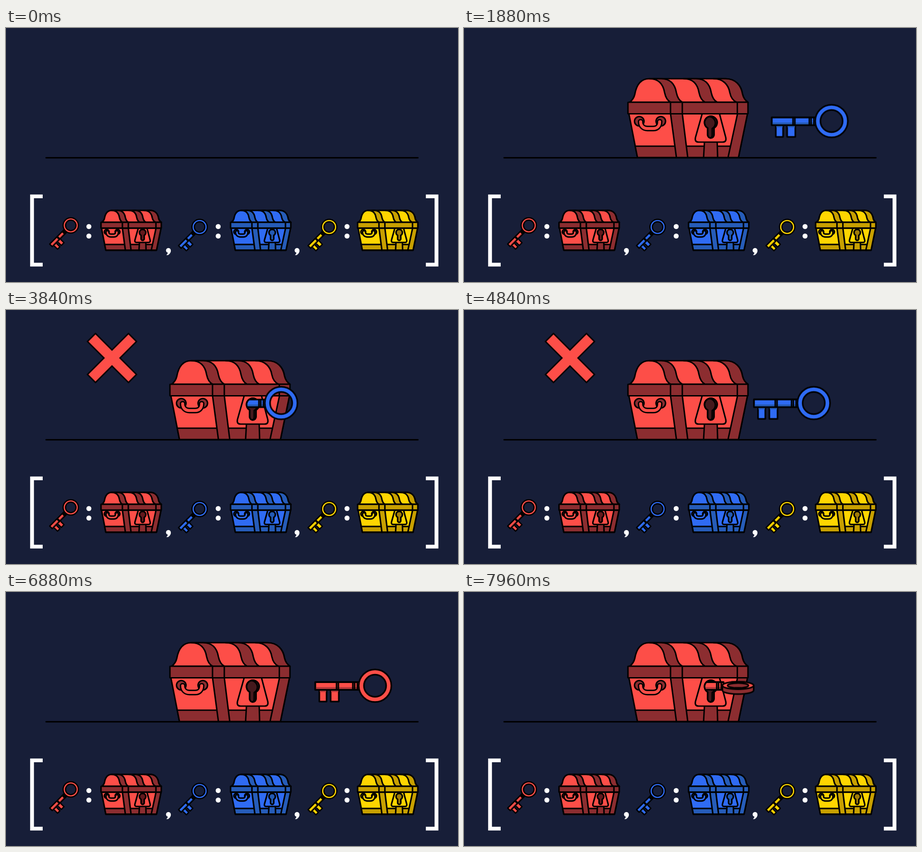
Write an HTML page that moves like this. It is 998 px wide and 561 px high and loops after 8000 ms.

```html
<!DOCTYPE html>
<html lang="en">
<head>
<meta charset="utf-8">
<title>Keys and chests</title>
<style>
  html, body { margin: 0; width: 100%; height: 100%; overflow: hidden; background: #171e38; }
  svg { display: block; width: 998px; height: 561px; }
  .art { stroke: #000; stroke-width: var(--w); stroke-linejoin: round; }
  .red { --light: #fd4e48; --dark: #8c2d30; --shade: #b8393a; --hole: #64191d; }
  .blue { --light: #2f6bf3; --dark: #265cb8; --shade: #265cb8; --hole: #235ab4; }
  .yellow { --light: #ffd500; --dark: #c8a000; --shade: #c8a000; --hole: #a07c08; }
  .l { fill: var(--light); }
  .d { fill: var(--dark); }
  .s { fill: var(--shade); }
  .n { fill: none; }
  .handle { fill: none; stroke-linecap: round; stroke-width: calc(6px + 2 * var(--w)); }
  .handle + .handle { stroke: var(--light); stroke-width: 6.5px; }
</style>
</head>
<body>
<svg id="stage" viewBox="0 0 998 561"></svg>
<script>
const HOLE = 'M538,221A14 14 0 1 1 552,221V236A7 7 0 0 1 538,236Z';

// Dark stripe over the lid between two parallel curves.
const stripe = (a, b) => `<path class="d" d="M${a},112c21,0 31,13 34,31c2,10 6,17 13,21
  H${b + 47}c-7,-4 -11,-11 -13,-21c-3,-18 -13,-31 -34,-31z"/>`;

function chest(color, width, detail = '') {
  return `<g class="art ${color}" style="--w:${width}px">
    <path class="l" d="M364,189L383,286H606L626,189Z"/>
    <path class="d" d="M378,261H606L602,286H383Z"/>
    <path class="d" d="M456,189H482L494,286H469Z"/>
    <path class="d" d="M604,189H626L606,286H583Z"/>
    <path class="d" d="M531,250H559L560,286H529Z"/>
    <path class="l" d="M526,189H564L578,242Q580,252 571,252H518Q509,252 511,242Z"/>
    <path d="${HOLE}" style="fill:var(--hole)"/>${detail}
    <circle class="d" cx="387" cy="206" r="10.5"/><circle class="d" cx="434.5" cy="206" r="10.5"/>
    ${'<path class="handle" d="M390,207C390,217 397,222 405,222H418C426,222 432,217 432,207"/>'.repeat(2)}
    <path class="l" d="M366,164C372,159 375,155 377,147C381,124 392,112 409,112H577
      C600,112 612,127 615,146C617,155 621,160 627,164Z"/>
    ${stripe(409, 435)}${stripe(485, 512)}
    <path class="d" d="M551,112c21,0 33,13 36,31c2,10 6,17 15,21H627
      C621,160 617,155 615,146C612,127 600,112 577,112Z"/>
    <rect class="d" x="362" y="164" width="265" height="25.5" rx="1"/>
    <path class="n" d="M456,164V189M482,164V189M603.5,164V189"/>
  </g>`;
}

const ellipse = (rx, ry) => `M${-rx},0A${rx} ${ry} 0 0 1 ${rx},0A${rx} ${ry} 0 0 1 ${-rx},0Z`;

// Key bow, turned about the shaft by a number of degrees.
function bow(deg) {
  const s = Math.sin(deg * Math.PI / 180), c = Math.cos(deg * Math.PI / 180);
  const R = 36 - 1.5 * s, r = 24.5 - 1.5 * s, ry = r * c, depth = 11 * s;
  const x = r * Math.sqrt(Math.max(0, 1 - (depth / 2 / ry) ** 2)), mid = depth / 2;
  const side = deg ? `<path class="d" fill-rule="evenodd" d="M${-R},0A${R} ${R * c} 0 0 1 ${R},0
    v${depth}A${R} ${R * c} 0 0 1 ${-R},${depth}Z
    M${-x},${mid}A${r} ${ry} 0 0 1 ${x},${mid}A${r} ${ry} 0 0 1 ${-x},${mid}Z"/>` : '';
  return `<g class="bow" transform="translate(${-2 * s} ${6 * s * c - 2 * s})">${side}
    <path class="l" fill-rule="evenodd" d="${ellipse(R, R * c)}${ellipse(r, ry)}"/></g>`;
}

function key(color, width, poses = [0]) {
  return `<g class="art ${color}" style="--w:${width}px">
    <path class="l" d="M-123,9h16v26h-16zM-98,9h18v26h-18z"/>
    <path class="s" stroke="none" d="M-122,10h14v4h-14zM-97,10h16v4h-16z"/>
    <path class="l" d="M-132,-8H-34V9H-132Z"/>
    <path class="s" stroke="none" d="M-131,3H-35V8H-131Z"/>
    <path class="n" d="M-132,-8H-34V9H-132ZM-85,-8V9M-81,-8V9M-49,-8V9M-45,-8V9M-39,-8V9"/>
    ${poses.map(bow).join('')}
  </g>`;
}

const entry = (color, keyX, keyY, colonX, chestX) => `
  <g transform="translate(${keyX} ${keyY}) rotate(-45) scale(.47)">${key(color, 5.8)}</g>
  <g fill="#fff"><circle cx="${colonX}" cy="438.5" r="5.5"/><circle cx="${colonX}" cy="459.5" r="5.5"/></g>
  <g transform="translate(${chestX} 346.3) scale(.502 .505)">${chest(color, 6.6)}</g>`;

const comma = x => `<path fill="#fff" d="M${x},486c3.500,0 5.500,2.500 5.500,6c0,4 -2.500,7 -6,9.500
  h-4c2,-2 3,-3.500 3.300,-5.200c-2.600,-.500 -4,-2.500 -4,-5c0,-3 2.200,-5.300 5.200,-5.300z"/>`;

const lockDepth = `<g clip-path="url(#hole)"><path fill="#45191d" transform="translate(-4 1)" d="${HOLE}"/></g>
  <path class="n" d="${HOLE}"/>`;

const TURN = [0, 1, 2, 3, 4, 5].map(i => i * 15.2);
const bigKey = (id, x, y, poses) => `<g id="${id}"><g transform="translate(${x} ${y})">
  <g class="lift">${key(id, 3.4, poses)}</g></g></g>`;

stage.innerHTML = `
  <defs>
    <clipPath id="hole"><path d="${HOLE}"/></clipPath>
    <clipPath id="ground"><path d="M0,0H998V286H0Z"/></clipPath>
    <clipPath id="lock"><path d="M545,0H998V286H545Z"/><path d="M545,195A14 14 0 0 0 534,217.500H545Z"/></clipPath>
  </defs>
  <g clip-path="url(#ground)">
    <g id="chest">${chest('red', 3.2, lockDepth)}</g>
    <g transform="translate(234 106)"><g id="cross">
      <path transform="rotate(45)" fill="#fd4e48" stroke="#000" stroke-width="3"
        d="M-12.500,-64h25v51.500h51.500v25h-51.500v51.500h-25v-51.500h-51.500v-25h51.500z"/>
    </g></g>
  </g>
  <g clip-path="url(#lock)">${bigKey('blue', 811.5, 205.5, TURN.slice(0, 2))}${bigKey('red', 815, 207, TURN)}</g>
  <path id="rim" fill="none" stroke="#000" stroke-width="3.200"
    d="M545,195A14 14 0 0 0 538,221V236A7 7 0 0 0 545,243"/>
  <path stroke="#000" stroke-width="3.200" stroke-linecap="round" d="M88.500,286.600H909.500"/>
  ${entry('red', 143, 436, 183, 28.1)}${comma(358.5)}
  ${entry('blue', 427.5, 439.5, 468.5, 314.1)}${comma(642.5)}
  ${entry('yellow', 713.5, 439.5, 753, 594.6)}
  <path fill="#fff" d="M53.300,367.800H81V376H61.700V518.600H81V526.800H53.300ZM954.700,367.800H927V376H946.300V518.600H927V526.800H954.700Z"/>`;

const LOOP = 8000;
const OUT = 'cubic-bezier(.22,1,.36,1)', IN_OUT = 'cubic-bezier(.65,0,.35,1)';
const IN = 'cubic-bezier(.33,0,.67,.33)', BACK = 'cubic-bezier(.34,1.95,.64,1)', HOLD = 'step-end';

// Each key is [ms, value, easing to the next key]; the ends are held.
function track(el, prop, keys) {
  const all = [...keys, [LOOP, keys.at(-1)[1]]];
  if (keys[0][0] > 0) all.unshift([0, keys[0][1], HOLD]);
  el.animate(all.map(([ms, value, easing = 'linear']) => ({ offset: ms / LOOP, [prop]: value, easing })),
    { duration: LOOP, iterations: Infinity });
}

// Visible only within the given spans of time.
function show(el, spans) {
  const keys = spans.flatMap(([a, b]) => [[a, 1, HOLD], [b, 0, HOLD]]).filter(([ms]) => ms < LOOP);
  if (keys[0][0] > 0) keys.unshift([0, 0, HOLD]);
  track(el, 'opacity', keys);
}

const $ = sel => document.querySelector(sel);
const at = (x, y, s = 1) => `translate(${x}px, ${y}px) scale(${s})`;

track($('#chest'), 'transform', [[220, at(0, 180), OUT], [750, at(0, 0)]]);
show($('#rim'), [[750, LOOP]]);

track($('#cross'), 'transform', [[3400, at(0, 0, 0), BACK], [3840, at(0, 0), 'linear'],
  [4960, at(0, 0), IN], [5545, at(0, 250, .4), HOLD], [5560, at(0, 400, 0)]]);

track($('#blue'), 'transform', [[2220, at(0, 0), IN_OUT], [2840, at(-204, 0), 'linear'],
  [4460, at(-204, 0), IN_OUT], [5060, at(0, 0)]]);
const blueLift = $('#blue .lift');
blueLift.style.transformOrigin = '-48px 0px';
track(blueLift, 'transform', [[1460, at(0, 130), OUT], [1920, at(0, 0), 'linear'],
  [5020, at(0, 0), IN], [5545, at(0, 250, .4)]]);

track($('#red'), 'transform', [[6860, at(0, 0), IN_OUT], [7440, at(-208, 0)]]);
track($('#red .lift'), 'transform', [[6100, at(0, 130), OUT], [6560, at(0, 0)]]);

// The wrong key only jiggles; the right one turns.
const [still, nudged] = document.querySelectorAll('#blue .bow');
show(nudged, [3120, 3280, 3440].map(t => [t, t + 80]));
show(still, [[0, 3120], [3200, 3280], [3360, 3440], [3520, LOOP]]);
document.querySelectorAll('#red .bow').forEach((el, i, { length }) =>
  show(el, [[i ? 7560 + 80 * i : 0, i < length - 1 ? 7640 + 80 * i : LOOP]]));
</script>
</body>
</html>
```
